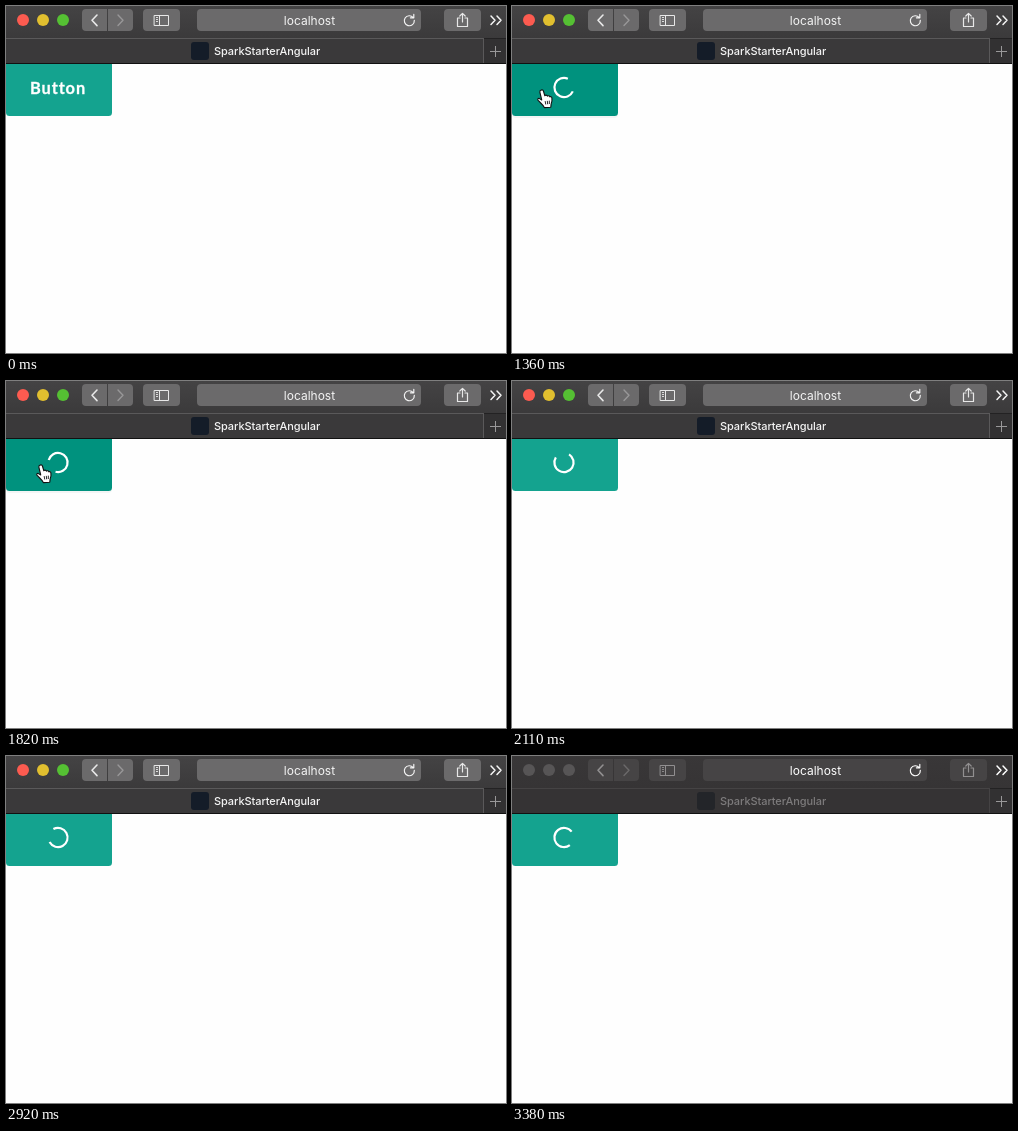
These frames come from a looping animation (500 px wide and 347 px high, 3480 ms). An HTML page:

```html
<!DOCTYPE html>
<html lang="en">
<head>
<meta charset="utf-8">
<title>Button loading state</title>
<style>
  html, body { margin: 0; width: 100%; height: 100%; overflow: hidden; background: #fefefe; }
  svg {
    display: block; width: 500px; height: 347px;
    --top: #444344; --bottom: #3b3a3b; --tab: #3a393a; --edge: #5a595a; --key: #6b6a6b;
    --icon: #e8e8e8; --faint: #989798; --title: #f4f4f4; --url: #f4f4f4;
    --red: #fc5b50; --yellow: #e1bf2f; --green: #55c033; --logo: #141c28;
  }
  svg.idle {
    --top: #393738; --bottom: #363435; --tab: #353334; --edge: #454344; --key: #464445;
    --icon: #918f90; --faint: #6b696a; --title: #7d7b7c; --url: #fff;
    --red: #575556; --yellow: #575556; --green: #575556; --logo: #232529;
  }
  .key { fill: var(--key); }
  .line { fill: none; stroke: var(--icon); stroke-linecap: round; stroke-linejoin: round; }
  .bright { stroke: var(--url); }
  text { font-family: Inter, "Liberation Sans", sans-serif; }
  #label { font: 700 16.4px Lato, sans-serif; letter-spacing: .9px; fill: #fff; stroke: #fff; stroke-width: .3; }
</style>
</head>
<body>
<svg id="stage" viewBox="0 0 500 347">
  <defs>
    <linearGradient id="bar" x2="0" y2="1">
      <stop style="stop-color:var(--top)"/>
      <stop offset="1" style="stop-color:var(--bottom)"/>
    </linearGradient>
  </defs>
  <rect width="500" height="347" fill="#fefefe"/>

  <!-- Page -->
  <rect id="shadow" y="52" width="106" height="60" rx="4" fill="#f3f5f5"/>
  <rect id="button" y="50" width="106" height="60" rx="3.5"/>
  <text id="label" x="24" y="88">Button</text>
  <path id="spinner" d="M58.79 74.71A9.6 9.6 0 1 0 58.79 88.29" fill="none" stroke="#fff" stroke-width="2.2"/>

  <!-- Toolbar -->
  <rect width="500" height="32" fill="url(#bar)"/>
  <rect y="32" width="500" height="25" fill="#323132"/>
  <rect y="32" width="478" height="25" style="fill:var(--edge)"/>
  <rect y="33" width="477" height="24" style="fill:var(--tab)"/>
  <path d="M478 32.5H500" stroke="#232223"/>
  <path d="M0 57.5H500" stroke="#111"/>
  <circle cx="17" cy="14" r="6" style="fill:var(--red)"/>
  <circle cx="37" cy="14" r="6" style="fill:var(--yellow)"/>
  <circle cx="57" cy="14" r="6" style="fill:var(--green)"/>
  <path class="key" d="M101 3H80a4 4 0 0 0-4 4V21a4 4 0 0 0 4 4H101Z"/>
  <path class="key" d="M102 3H123a4 4 0 0 1 4 4V21a4 4 0 0 1-4 4H102Z"/>
  <rect class="key" x="137" y="3" width="37" height="22" rx="4"/>
  <rect class="key" x="191" y="3" width="224" height="22" rx="4"/>
  <rect class="key" x="438" y="3" width="37" height="22" rx="4"/>
  <path class="line" d="M91 9L86 14.3L91 19.6" stroke-width="1.6"/>
  <path class="line" d="M112 9L117 14.3L112 19.6" stroke-width="1.4" style="stroke:var(--faint)"/>
  <path class="line" d="M148.5 9.5H162.5V19.5H148.5ZM153.5 9.5V19.5M150.5 11.5H151.5M150.5 13.5H151.5M150.5 15.5H151.5"/>
  <path class="line" d="M454 12H451.5V20.5H461.5V12H459M456.5 16V7.5M453.8 10L456.5 7.3L459.2 10" stroke-width="1.2"/>
  <path class="line bright" d="M407.2 11.6A5 5 0 1 0 408.3 14.4M407.8 8.4V11.8H404.4" stroke-width="1.2"/>
  <path class="line bright" d="M485 10L489 14.2L485 18.4M491 10L495 14.2L491 18.4" stroke-width="1.5"/>
  <path d="M484 45.5H495M489.5 40V51" stroke="#999899"/>
  <text x="303.5" y="19" font-size="12" text-anchor="middle" style="fill:var(--url)">localhost</text>
  <rect x="185" y="36" width="18" height="18" rx="3" style="fill:var(--logo)"/>
  <text x="208" y="49" font-size="11" font-weight="500" letter-spacing="-.07" style="fill:var(--title)">SparkStarterAngular</text>

  <g id="hand" stroke="#111" stroke-linejoin="round">
    <path fill="#fff" d="M3.4 1.2C4.6.4 5.5 1 5.8 2L7 6C7.6 5.2 8.9 5.3 9.3 6.4C10 5.7 11.2 6 11.5 7C12.3 6.5 13.2 7 13.3 8C13.6 10 13.3 12 12.6 13.5L12.3 16.3L6.6 16.6C6 14.5 3 12.5 1 10.2C0 8.8 1.4 7.9 2.6 8.8L4.2 9.8L2.6 3C2.4 2.2 2.7 1.5 3.4 1.2Z"/>
    <path d="M7.3 10.8L7.8 13.8M9.2 10.6L9.5 13.6M11 10.4V13.4" stroke-width=".8"/>
  </g>
</svg>
<script>
  const LOOP = 3480, CLICK = 1360, LEAVE = 1880, BLUR = 3380;
  const STEP = 57.7, TURN = 21.4;
  const approach = [[950, -7, 78], [1000, 4, 79], [1060, 14, 79]];
  const el = id => document.getElementById(id);
  const [stage, button, shadow, label, spinner, hand] =
    ["stage", "button", "shadow", "label", "spinner", "hand"].map(el);
  const show = (node, on) => node.setAttribute("visibility", on ? "visible" : "hidden");

  function handAt(t, tick) {
    if (t >= CLICK) return [Math.min(25 + tick, 30), 83];
    return approach.filter(p => p[0] <= t).pop().slice(1);
  }

  function draw(t) {
    const loading = t >= CLICK;
    const hover = loading && t < LEAVE;
    const tick = Math.floor((t - CLICK + 3) / STEP);
    const pointing = t >= approach[0][0] && t < LEAVE;

    stage.classList.toggle("idle", t >= BLUR);
    button.setAttribute("fill", hover ? "#00927e" : "#14a38f");
    show(shadow, hover);
    show(label, !loading);
    show(spinner, loading);
    show(hand, pointing);
    spinner.setAttribute("transform", `rotate(${(tick - 1) * TURN} 52 81.5)`);
    if (pointing) hand.setAttribute("transform", `translate(${handAt(t, tick)}) scale(1.12)`);
  }

  const start = performance.now();
  function frame() {
    draw((performance.now() - start) % LOOP);
    requestAnimationFrame(frame);
  }
  frame();
</script>
</body>
</html>
```
